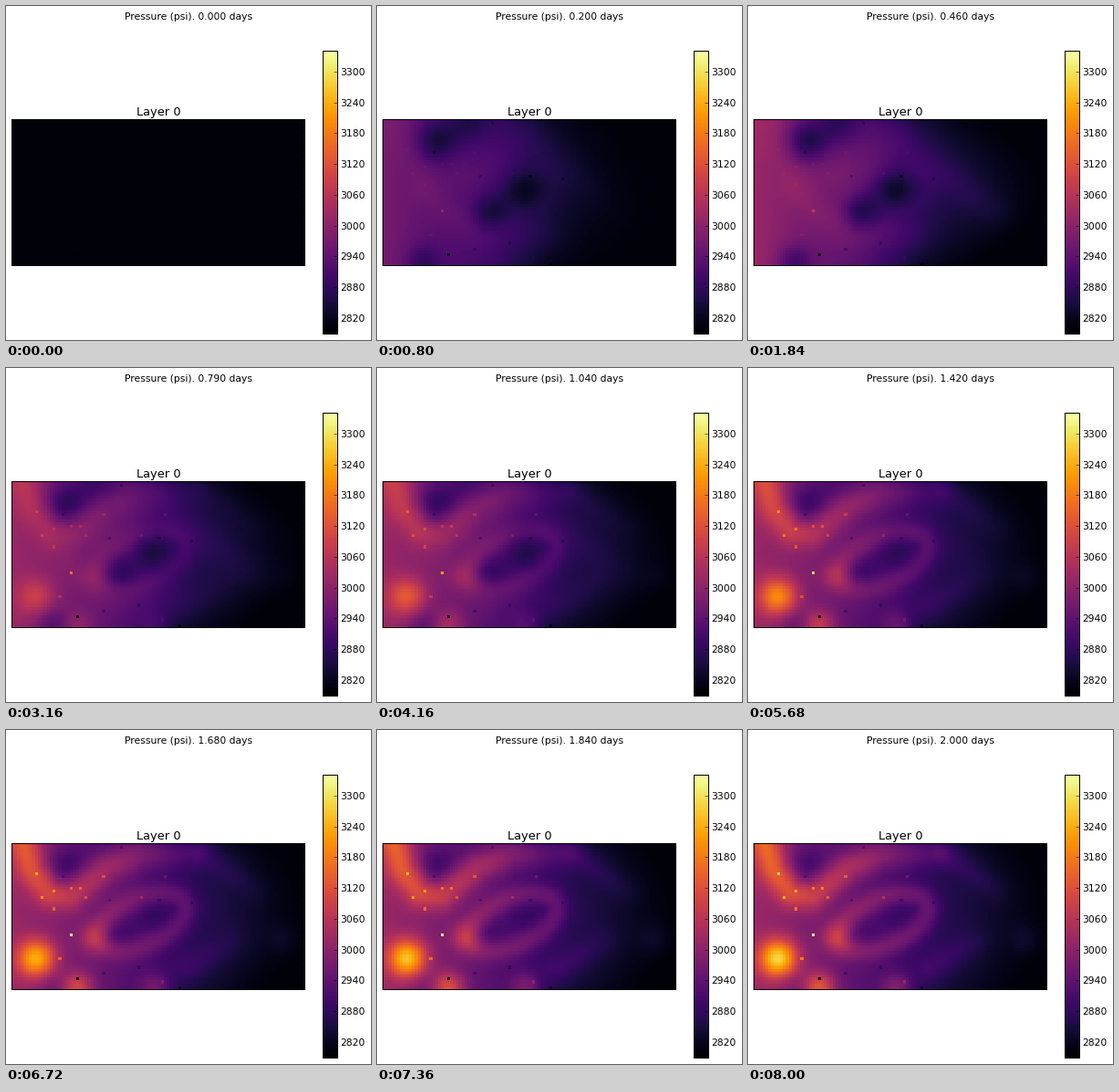
Write a matplotlib script that moves like this. It is 400 px wide and 366 px high and loops after 8040 ms.

```python
import numpy as np
import matplotlib.pyplot as plt
from matplotlib.animation import FuncAnimation

W, H, DPI = 400, 366, 64
FRAMES, STEP = 201, 40
VMIN, VMAX, REST = 2789, 3341, 2798
NX, NY = 100, 50
ARRIVE, END = 0.46, 2.0  # days: the front has passed, the run stops
PX = 72 / DPI  # one pixel in points

plt.rcParams["font.family"] = "DejaVu Sans"
U, V = np.meshgrid(np.arange(NX) + 0.5, np.arange(NY) + 0.5)

# Early and late pressure gain, far-end strength, width, course of the channel
CHANNELS = [
    (14, 150, 0.35, 3.8, [(4, 0), (7, 9), (13, 17), (20, 18), (33, 8), (44, 4), (62, 3)]),
    (0, 36, 0.5, 3.2, [(66, 4), (83, 16)]),
    (0, 36, 0.6, 3.4, [(60, 43), (75, 34)]),
    (28, 0, 0.9, 4.0, [(15, 24), (33, 41), (54, 40)]),
    (30, 0, 0.7, 4.5, [(30, 20), (50, 7.5), (82, 31)]),
]
# Early and late gain, centre, radius
SPOTS = [
    (0, 290, 8.5, 39.5, 4.6),
    (0, 85, 28, 32.5, 3.8),
    (0, 165, 22.5, 49.5, 3.8),
    (6, 95, 49, 49.5, 3.8),
    (0, 25, 93, 33, 3.6),
    (-105, -70, 18.5, 7.5, 5.0),
    (-65, -25, 37, 32, 4.2),
    (-65, -15, 48, 24, 4.4),
    (-80, -20, 14, 49, 4.2),
    (-65, -15, 29, 1, 5.0),
]
INJECTORS = [(8, 10), (10, 18), (14, 22), (16, 39), (25, 18), (14, 16),
             (20, 15), (23, 15), (31, 11), (44, 18), (52, 11), (51, 47)]
PRODUCERS = [(61, 20), (50, 19), (31, 44), (37, 1), (17, 11), (57, 49), (43, 42), (33, 19)]
MAIN, SHUT = (20, 31), (22, 46)


def bump(x, y, r):
    return np.exp(-((U - x) ** 2 + (V - y) ** 2) / (2 * r * r))


def channel(pts, tail, width):
    x, y = np.array(pts, float).T
    k, s = np.linspace(0, 1, len(pts)), np.linspace(0, 1, 120)
    trail = zip(s, np.interp(s, k, x), np.interp(s, k, y))
    return np.max([(1 - (1 - tail) * f * f) * bump(a, b, width) for f, a, b in trail], axis=0)


def ring(x, y, a, b, tilt, width):
    c, s = np.cos(np.radians(tilt)), np.sin(np.radians(tilt))
    q = np.linspace(0, 2 * np.pi, 120)
    px = x + a * np.cos(q) * c - b * np.sin(q) * s
    py = y + a * np.cos(q) * s + b * np.sin(q) * c
    return np.max([bump(i, j, width) for i, j in zip(px, py)], axis=0)


def gains():
    loop = ring(44.5, 27, 16, 8, -23, 2.8)
    early, late = 10 * loop, 68 * loop
    shapes = [(e, l, channel(pts, tail, w)) for e, l, tail, w, pts in CHANNELS]
    shapes += [(e, l, bump(*spot)) for e, l, *spot in SPOTS]
    for e, l, shape in shapes:
        early += e * shape
        late += l * shape
    for u, v in INJECTORS:
        early[v, u] += 15
        late[v, u] += 170 * (1 - u / 80)
    for u, v in PRODUCERS:
        early[v, u] -= 45
        late[v, u] -= 45
    early[MAIN[::-1]] += 90
    late[MAIN[::-1]] += 390
    return early, late


EARLY, LATE = gains()
EDGE = np.clip((U - 38) / 18, 0, 1) * ((V - 24) / 25) ** 2


def pressure(t):
    g = max(0, (t - ARRIVE) / (END - ARRIVE)) ** 0.75
    x = np.clip((U + (22 - 12 * g) * EDGE) / NX, 0, 1)
    rise = 220 * (1 - x) ** (1.25 - 0.15 * g) + EARLY * (1 - g) + LATE * g
    if t < ARRIVE:
        s = np.sqrt(t / ARRIVE)
        rise *= s ** 0.6 / (1 + np.exp((U - 110 * s) / 10))
    p = REST + rise
    p[SHUT[::-1]] = p[::2, -1] = VMIN
    return p


def panel(x0, y0, x1, y1):
    ax = fig.add_axes([x0 / W, 1 - y1 / H, (x1 - x0) / W, (y1 - y0) / H])
    for spine in ax.spines.values():
        spine.set_linewidth(PX)
    return ax


def label(x, y, text, size):
    return fig.text(x / W, 1 - y / H, text, size=size * PX, ha="center", va="baseline")


fig = plt.figure(figsize=(W / DPI, H / DPI), dpi=DPI, facecolor="white")

ax = panel(6, 124, 327, 284)
image = ax.imshow(pressure(0), cmap="inferno", vmin=VMIN, vmax=VMAX,
                  interpolation="nearest", aspect="auto")
ax.set_xticks([])
ax.set_yticks([])

bar = panel(347, 49, 363, 359)
bar.imshow(np.linspace(0, 1, 256)[:, None], cmap="inferno", origin="lower",
           extent=(0, 1, VMIN, VMAX), aspect="auto")
bar.set_xticks([])
bar.set_yticks(range(2820, 3301, 60))
bar.yaxis.tick_right()
bar.tick_params(axis="y", direction="in", length=3.6 * PX, width=0.5 * PX,
                pad=3.6 * PX, labelsize=10.8 * PX)

label(167, 120, "Layer 0", 12.96)
title = label(200.2, 15, "", 10.8)


def draw(i):
    t = i / 100
    image.set_data(pressure(t))
    title.set_text(f"Pressure (psi). {t:.3f} days")
    return image, title


anim = FuncAnimation(fig, draw, frames=FRAMES, interval=STEP, repeat=True,
                     repeat_delay=0, blit=False)
plt.show()
```
